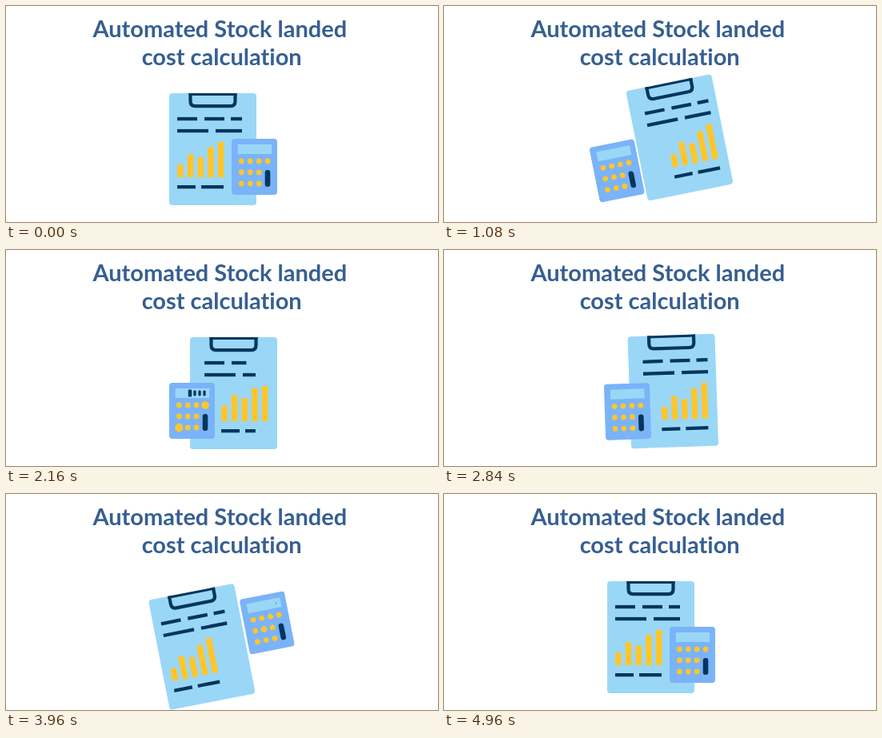
Write an HTML page that moves like this. It is 540x270 px and loops after 5000 ms.

```html
<!DOCTYPE html>
<html lang="en">
<head>
<meta charset="utf-8">
<title>Stock landed cost</title>
<style>
html, body { margin: 0; width: 100%; height: 100%; overflow: hidden; background: #fff; }
svg { display: block; width: 540px; height: 270px; }
text {
  font: 700 29px Lato, sans-serif; font-variant-ligatures: none;
  fill: #365f91; text-anchor: middle;
}
</style>
</head>
<body>
<svg id="stage" viewBox="0 0 540 270">
  <text x="267.3" y="39">Automated Stock landed</text>
  <text x="269.7" y="74">cost calculation</text>
</svg>
<script>
const LOOP = 5000, STEP = 40;
const SKY = '#9ad7f7', BLUE = '#7ab3f8', NAVY = '#04365c', GOLD = '#fec62b';
const stage = document.getElementById('stage');

function add(parent, tag, attrs) {
  const el = document.createElementNS('http://www.w3.org/2000/svg', tag);
  set(el, attrs);
  parent.appendChild(el);
  return el;
}
function set(el, attrs) {
  for (const k in attrs) el.setAttribute(k, attrs[k]);
}
const box = (p, x, y, width, height, fill, rx = 0) =>
  add(p, 'rect', { x, y, width, height, fill, rx });
const clamp = v => Math.max(0, Math.min(1, v));
const ramp = (t, a, b) => clamp((t - a) / (b - a));
const ease = u => u * u * (3 - 2 * u);
const mix = (a, b, u) => a + (b - a) * u;

// Clipboard, drawn around its centre
const board = add(stage, 'g', {});
box(board, -54.5, -70, 109, 140, SKY, 4);
add(board, 'path', {
  d: 'M-28 -70V-60Q-28 -53.8 -22 -53.8H22Q28 -53.8 28 -60V-70',
  fill: 'none', stroke: NAVY, 'stroke-width': 4.2
});
box(board, -30, -70, 60, 3, NAVY);
const head = add(board, 'g', {}), foot = add(board, 'g', {});
const rows = [
  { g: head, y: -40.1, end: 2400, parts: [[0, 25], [34, 25], [67, 14]] },
  { g: head, y: -25.1, end: 2277, parts: [[0, 39], [48, 33]] },
  { g: foot, y: 45, end: 2315, parts: [[0, 23], [30, 28]] }
];
for (const r of rows) {
  const last = r.parts[r.parts.length - 1];
  r.len = last[0] + last[1];
  r.els = r.parts.map(([x, w]) => box(r.g, x - 44.5, r.y, w, 4.3, NAVY));
}
const FLOOR = 35.2;
const bars = [16, 29, 25, 38, 44.3].map((h, i) =>
  ({ h, el: box(foot, -44.3 + 12.65 * i, FLOOR - h, 7.5, h, GOLD) }));

// Calculator, drawn around its centre
const calc = add(stage, 'g', {});
box(calc, -28.5, -35, 57, 70, BLUE, 4);
box(calc, -20.8, -28, 42.5, 12, SKY);
const keys = [];
for (let r = 0; r < 3; r++)
  for (let c = 0; c < (r ? 3 : 4); c++)
    keys.push(add(calc, 'circle', { cx: -16.2 + 10.9 * c, cy: -7 + 14 * r, r: 3.4, fill: GOLD }));
box(calc, 13.2, 4, 6.6, 21, NAVY, 3.2);
const digits = Array.from({ length: 6 }, () => box(calc, 0, 0, 0, 0, NAVY, 1.4));
const presses = [5, 1, 9, 3, 7, 4, 0];

// Pose: board x, y, calculator x, y, angle, content shift
const home = [258.5, 179, 310.5, 201, 0, 0];
const spread = [244.8, 191, 326.4, 160.8, -11.2, 0];
const swapped = [295.2, 164, 214.6, 206.6, -11.4, 1];
const away = [284.5, 179, 232.5, 201, 0, 1];
function tilt(deg) {
  const a = deg * Math.PI / 180, c = Math.cos(a), s = Math.sin(a), px = 280, py = 190;
  const turn = (x, y) => [px + (x - px) * c - (y - py) * s, py + (x - px) * s + (y - py) * c];
  return [...turn(home[0], home[1]), ...turn(home[2], home[3]), deg, 0];
}
const OUT = [560, 1120], BACK = [3240, 3940];
const track = [
  [0, home], [OUT[0], spread], [OUT[1], swapped], [1680, away], [2700, away],
  [BACK[0], swapped], [BACK[1], spread], [4460, tilt(8.5)], [4720, tilt(-6.5)],
  [4960, home], [LOOP, home]
];

function poseAt(t) {
  let i = 0;
  while (i < track.length - 2 && t >= track[i + 1][0]) i++;
  const [t0, a] = track[i], [t1, b] = track[i + 1];
  const u = ease(ramp(t, t0, t1));
  return a.map((v, k) => mix(v, b[k], u));
}

function drawRows(t) {
  for (const r of rows) {
    const shown = t < 1720 ? r.len : r.len * ramp(t, 1720, r.end);
    r.parts.forEach(([x, w], i) =>
      r.els[i].setAttribute('width', Math.max(0, Math.min(w, shown - x))));
  }
}

function drawBars(t) {
  const fall = 1 - ease(ramp(t, 2440, 2680));
  bars.forEach((b, i) => {
    const h = b.h + 4 * ease(ramp(t, 1720 + 110 * i, 1860 + 110 * i)) * fall;
    set(b.el, { y: FLOOR - h, height: h });
  });
}

function drawTyping(t) {
  const from = t > 3200 ? 3945 : 1725;
  const fade = 1 - ease(ramp(t, from + 720, from + 840));
  digits.forEach((d, i) => {
    const u = ramp(t, from + 110 * i, from + 110 * i + 150);
    const s = fade * (ease(u) + 0.7 * Math.sin(Math.PI * u));
    const w = 3.3 * s, h = 6.8 * s;
    set(d, { x: 15.5 - 6 * i - w / 2, y: -22 - h / 2, width: w, height: h });
  });
  keys.forEach((k, i) => {
    const n = presses.indexOf(i);
    const u = n < 0 ? 0 : ramp(t, from + 90 * n, from + 90 * n + 220);
    k.setAttribute('r', 3.4 + 2 * Math.sin(Math.PI * u));
  });
}

const within = (t, [a, b]) => t > a && t < b;
let behind = false;
function draw(t) {
  const [bx, by, cx, cy, ang, shift] = poseAt(t);
  board.setAttribute('transform', `translate(${bx} ${by}) rotate(${ang})`);
  calc.setAttribute('transform', `translate(${cx} ${cy}) rotate(${ang})`);
  head.setAttribute('transform', `translate(${8 * shift} 0)`);
  foot.setAttribute('transform', `translate(${29 * shift} 0)`);
  // The calculator passes under the board while they trade sides
  const under = within(t, OUT) || within(t, BACK);
  if (under !== behind) {
    stage.appendChild(under ? board : calc);
    behind = under;
  }
  drawRows(t);
  drawBars(t);
  drawTyping(t);
}

const start = performance.now();
function tick(now) {
  const t = Math.max(0, now - start) % LOOP;
  draw(Math.floor(t / STEP) * STEP);
  requestAnimationFrame(tick);
}
draw(0);
requestAnimationFrame(tick);
</script>
</body>
</html>
```
